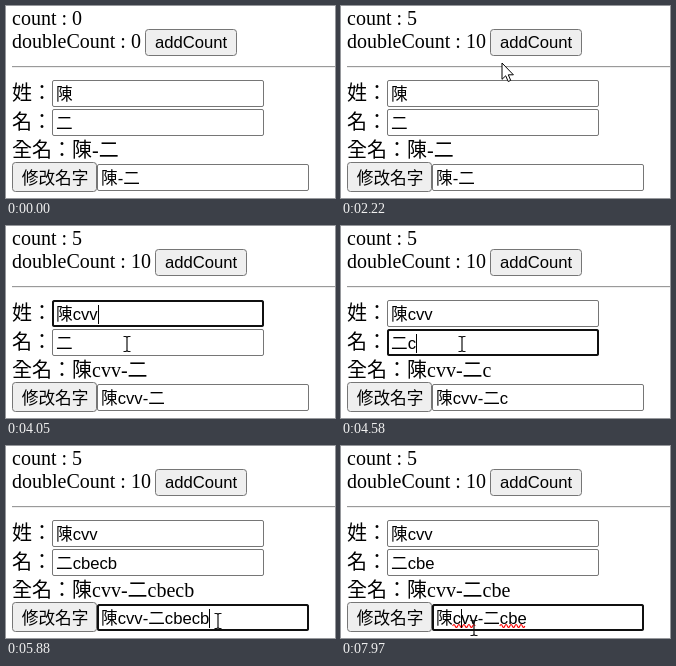
These frames come from a looping animation (329x192 px, 8000 ms). An HTML page:

```html
<!DOCTYPE html>
<html lang="zh-TW">
<head>
<meta charset="utf-8">
<title>computed</title>
<style>
html, body { margin: 0; width: 100%; height: 100%; overflow: hidden; background: #fff; }
svg { display: block; width: 329px; height: 192px; font-weight: 300; }
.page { font: 300 20px "Liberation Serif", "Noto Sans CJK TC", "Noto Sans CJK JP", serif; }
.ctl { font: 300 16.667px "Liberation Sans", "Noto Sans CJK TC", "Noto Sans CJK JP", sans-serif; }
.box { fill: #fff; stroke: #767676; }
.ring { fill: none; stroke: #101010; stroke-width: 2; }
.btn { fill: #efefef; stroke: #767676; }
.btn.hover { fill: #e5e5e5; stroke: #4f4f4f; }
.btn.active { fill: #f5f5f5; stroke: #8d8d8d; }
.wave { fill: none; stroke: #f00; stroke-width: 1.1; }
</style>
</head>
<body>
<svg id="stage" viewBox="0 0 329 192"></svg>
<script>
const LOOP = 8000, BLINK = 530;
const stage = document.getElementById('stage');

function add(tag, attrs, text = '', parent = stage) {
  const el = document.createElementNS('http://www.w3.org/2000/svg', tag);
  for (const k in attrs) el.setAttribute(k, attrs[k]);
  el.textContent = text;
  return parent.appendChild(el);
}
const label = (x, y, text, cls = 'page') => add('text', { x, y, class: cls }, text);
// the outline stays inside the given box
const rect = (x, y, w, h, rx, cls, line = 1) => add('rect', {
  x: x + line / 2, y: y + line / 2, width: w - line, height: h - line, rx, class: cls
});
const show = (el, on) => el.setAttribute('visibility', on ? 'visible' : 'hidden');

function field(x, y) {
  return {
    x: x + 4, y,
    box: rect(x, y, 212, 27, 1.5, 'box'),
    ring: rect(x, y, 212, 27, 1.5, 'ring', 2),
    text: label(x + 4, y + 20, '', 'ctl')
  };
}

const countText = label(6, 19, '');
const doubleText = label(6, 42, '');
const addBtn = add('g', {});
addBtn.append(rect(139, 23, 92, 27, 3, 'btn'), label(149, 42, 'addCount', 'ctl'));
add('rect', { x: 6, y: 60, width: 323, height: 1, fill: '#9a9a9a' });
add('rect', { x: 6, y: 61, width: 323, height: 1, fill: '#eee' });
label(6, 94, '姓：');
label(6, 123, '名：');
const fullText = label(6, 151, '');
rect(6, 156, 85, 30, 3, 'btn');
label(15.8, 178, '修改名字', 'ctl');
const fields = [field(46, 74), field(46, 103), field(91, 158)];
const waves = [add('path', { class: 'wave' }), add('path', { class: 'wave' })];
const caret = add('rect', { width: 1, height: 19, fill: '#000' });
const pointers = {
  arrow: add('path', {
    d: 'M0 0V16.3L3.7 12.8L6.2 18.5L8.7 17.4L6.3 11.8H11.4Z',
    fill: '#fff', stroke: '#000', 'stroke-linejoin': 'round'
  }),
  beam: add('path', {
    d: 'M-3.5 -7.5H-1L0 -6.5L1 -7.5H3.5M0 -6.5V6.5M-3.5 7.5H-1L0 6.5L1 7.5H3.5',
    fill: 'none', stroke: '#111', 'stroke-width': 1.2
  })
};

// mouse down, mouse up
const clicks = [[750, 810], [1140, 1210], [1340, 1410], [1610, 1680], [1870, 1940]];

// time, family name, given name, focused field, caret index, misspelled words marked
const edits = [
  [0, '陳', '二', -1, -1, 0],
  [2500, '陳', '二', 0, 1, 0],
  [2600, '陳', '二', 0, 1, 0],
  [3450, '陳c', '二', 0, 2, 0],
  [3720, '陳cv', '二', 0, 3, 0],
  [3980, '陳cvv', '二', 0, 4, 0],
  [4260, '陳cvv', '二', 1, 1, 0],
  [4580, '陳cvv', '二c', 1, 2, 0],
  [4850, '陳cvv', '二cb', 1, 3, 0],
  [4990, '陳cvv', '二cbe', 1, 4, 0],
  [5130, '陳cvv', '二cbec', 1, 5, 0],
  [5260, '陳cvv', '二cbecb', 1, 6, 0],
  [5820, '陳cvv', '二cbecb', 2, 11, 0],
  [6550, '陳cvv', '二cbec', 2, 10, 1],
  [6680, '陳cvv', '二cbe', 2, -1, 1],
  [6820, '陳cvv', '二cbe', 2, 9, 1],
  [7520, '陳cvv', '二cbe', 2, 2, 2]
];

// start, end, steps, x, y, pointer shape
const moves = [
  [0, 0, 1, 304, 121, ''],
  [200, 550, 6, 171, 41, 'arrow'],
  [2220, 2220, 1, 161, 57, 'arrow'],
  [2290, 2500, 4, 121, 88, 'beam'],
  [3450, 3450, 1, 121, 88, ''],
  [4050, 4050, 1, 121, 118, 'beam'],
  [4850, 4850, 1, 121, 118, ''],
  [5320, 5390, 2, 180, 156, 'beam'],
  [5460, 5600, 3, 198, 168, 'beam'],
  [5670, 5810, 3, 212, 175, 'beam'],
  [6680, 6750, 2, 204, 178, 'beam'],
  [7100, 7310, 4, 160, 178, 'beam'],
  [7380, 7520, 3, 122, 178, 'beam'],
  [7770, 7970, 4, 133, 182, 'beam']
];

const lastAt = (rows, t) => rows.reduce((n, row, i) => row[0] <= t ? i : n, 0);

function pointerAt(t) {
  const i = lastAt(moves, t);
  const [start, end, steps, x, y, shape] = moves[i];
  const from = moves[Math.max(0, i - 1)];
  const gap = (end - start) / (steps - 1) || 1;
  const p = Math.min(1, (Math.floor((t - start) / gap) + 1) / steps);
  return { x: from[3] + (x - from[3]) * p, y: from[4] + (y - from[4]) * p, shape };
}

const widthTo = (f, n) => n > 0 ? f.text.getSubStringLength(0, n) : 0;

function drawWave(el, f, from, to, on) {
  show(el, on);
  if (!on) return;
  const end = f.x + widthTo(f, to);
  let x = f.x + widthTo(f, from), up = true, d = `M${x} 180`;
  while (x + 2.5 <= end) {
    d += `q1.25 ${up ? -3 : 3} 2.5 0`;
    x += 2.5;
    up = !up;
  }
  el.setAttribute('d', d);
}

const setText = (el, s) => { if (el.textContent !== s) el.textContent = s; };

function draw(t) {
  const count = clicks.filter(c => c[1] <= t).length;
  setText(countText, 'count : ' + count);
  setText(doubleText, 'doubleCount : ' + count * 2);
  addBtn.setAttribute('transform', `translate(${count > 4 ? 10 : 0} 0)`);
  const down = clicks.some(c => t >= c[0] && t < c[1]);
  const hover = t >= 480 && t < 2220;
  addBtn.firstChild.setAttribute('class', 'btn' + (down ? ' active' : hover ? ' hover' : ''));

  const [since, family, given, focus, index, marked] = edits[lastAt(edits, t)];
  const full = family + '-' + given;
  setText(fullText, '全名：' + full);
  [family, given, full].forEach((s, i) => {
    setText(fields[i].text, s);
    show(fields[i].ring, i === focus);
  });
  const lit = index >= 0 && Math.floor((t - since) / BLINK) % 2 === 0;
  show(caret, lit);
  if (lit) {
    const f = fields[focus];
    caret.setAttribute('x', Math.round(f.x + widthTo(f, index)));
    caret.setAttribute('y', f.y + 5);
  }
  drawWave(waves[0], fields[2], 1, 4, marked > 0);
  drawWave(waves[1], fields[2], 6, 9, marked > 1);

  const m = pointerAt(t);
  for (const name in pointers) {
    show(pointers[name], name === m.shape);
    pointers[name].setAttribute('transform', `translate(${m.x} ${m.y})`);
  }
}

function tick() {
  draw(performance.now() % LOOP);
  requestAnimationFrame(tick);
}
tick();
</script>
</body>
</html>
```
